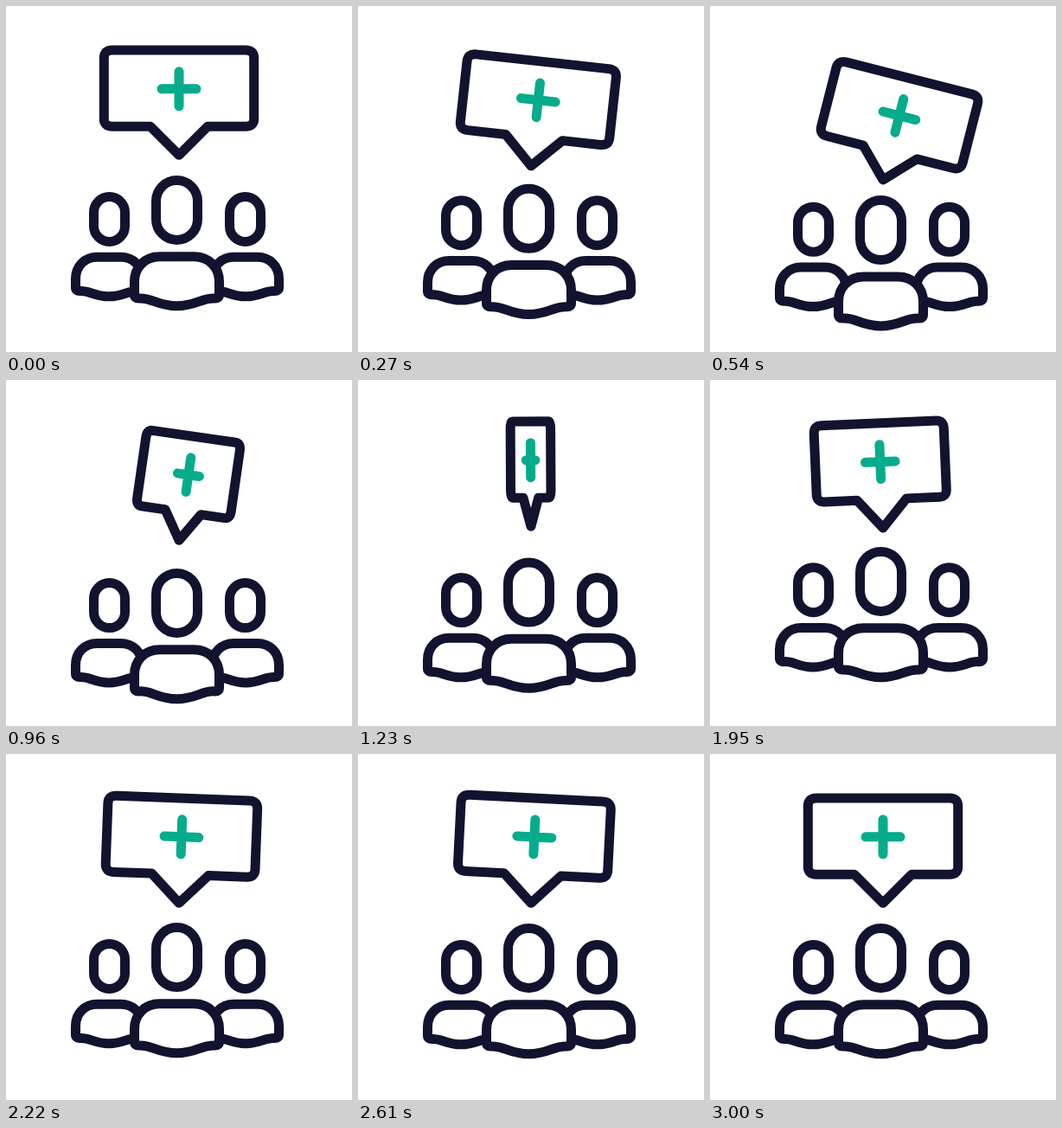
An HTML page with a canvas that plays this animation: 400x400 px, repeating every 3.09 s.

```html
<!DOCTYPE html>
<html lang="en">
<head>
<meta charset="utf-8">
<title>Team and speech bubble</title>
<style>
html, body { margin: 0; width: 100%; height: 100%; overflow: hidden; background: #fff; }
canvas { display: block; width: 400px; height: 400px; }
</style>
</head>
<body>
<canvas id="stage" width="400" height="400"></canvas>
<script>
const ctx = document.getElementById('stage').getContext('2d');
const NAVY = '#11132f', GREEN = '#04ac8c';
const STEP = 30, END = 3000, LOOP = 3090;
const TIP = { x: 200, y: 172.3 };

// Eased progress from 0 to 1 between two times.
function ease(t, from, to) {
  const u = Math.min(1, Math.max(0, (t - from) / (to - from)));
  return u * u * (3 - 2 * u);
}

// Each motion dips, swings back a little too far, then settles.
const leaderY = t => 24.2 * ease(t, 0, 620) - 28 * ease(t, 820, 1615) + 3.8 * ease(t, 1750, 2450);
const sideY = t => 15 * ease(t, 0, 770) - 19.2 * ease(t, 830, 1810) + 4.2 * ease(t, 1850, 2400);
const bubbleY = t => 29.5 * ease(t, 0, 600) - 35 * ease(t, 600, 1350) + 5.5 * ease(t, 1500, 2150);
const tilt = t => 14.7 * ease(t, 0, 600) - 21 * ease(t, 600, 1573) +
  10.1 * ease(t, 1600, 2430) - 3.8 * ease(t, 2430, 3000);
// The card makes half a turn in two overlapping quarters.
const turn = t => Math.PI / 2 * (ease(t, 200, 1600) + ease(t, 1300, 2360));

function pill(x, y, w, h) {
  const p = new Path2D(), r = w / 2;
  p.arc(x + r, y + r, r, Math.PI, 0);
  p.arc(x + r, y + h - r, r, 0, Math.PI);
  p.closePath();
  return p;
}

// Shoulders with a wavy hem, centred on x.
function torso(x, top, half, shoulder, foot, hem) {
  const p = new Path2D(), l = x - half, r = x + half;
  p.moveTo(l, foot - 4);
  p.lineTo(l, top + shoulder);
  p.bezierCurveTo(l, top + shoulder * 0.42, l + shoulder * 0.42, top, l + shoulder, top);
  p.lineTo(r - shoulder, top);
  p.bezierCurveTo(r - shoulder * 0.42, top, r, top + shoulder * 0.42, r, top + shoulder);
  p.lineTo(r, foot - 4);
  p.quadraticCurveTo(r, foot, r - 5, foot);
  p.bezierCurveTo(x + half * 0.58, foot - 1, x + half * 0.46, hem, x, hem);
  p.bezierCurveTo(x - half * 0.46, hem, x - half * 0.58, foot - 1, l + 5, foot);
  p.quadraticCurveTo(l, foot, l, foot - 4);
  p.closePath();
  return p;
}

const leaderHead = pill(173.5, 201.5, 48, 69);
const leaderBody = torso(197.5, 289.8, 49, 29, 338, 346.8);
const sideHead = pill(101.5, 220.5, 36, 52);
const sideBody = torso(119, 290.3, 38.5, 25, 329.5, 335.8);

// Bubble and plus are relative to the bubble's tip.
const bubble = new Path2D('M0 0L-33 -33H-77Q-86.7 -33 -86.7 -42V-112Q-86.7 -121.3 -77 -121.3' +
  'H77Q86.7 -121.3 86.7 -112V-42Q86.7 -33 77 -33H33Z');
const plus = new Path2D('M-20 -76.5H20M0 -96.5V-56.5');

function outline(path, color = NAVY) {
  ctx.strokeStyle = color;
  ctx.stroke(path);
}

function drawSide(dy, mirrored) {
  ctx.save();
  ctx.translate(mirrored ? 396 : 0, dy);
  if (mirrored) ctx.scale(-1, 1);
  outline(sideHead);
  outline(sideBody);
  ctx.restore();
}

function drawLeader(dy) {
  ctx.save();
  ctx.translate(0, dy);
  outline(leaderHead);
  ctx.fillStyle = '#fff';
  ctx.fill(leaderBody);
  outline(leaderBody);
  ctx.restore();
}

function drawBubble(t) {
  const place = new DOMMatrix()
    .translate(TIP.x, TIP.y + bubbleY(t))
    .rotate(tilt(t))
    .scale(Math.abs(Math.cos(turn(t))), 1);
  // Transform the path only, so the line keeps its weight.
  for (const [shape, color] of [[bubble, NAVY], [plus, GREEN]]) {
    const p = new Path2D();
    p.addPath(shape, place);
    outline(p, color);
  }
}

function draw(t) {
  ctx.fillStyle = '#fff';
  ctx.fillRect(0, 0, 400, 400);
  ctx.lineWidth = 11;
  ctx.lineCap = ctx.lineJoin = 'round';
  drawSide(sideY(t), false);
  drawSide(sideY(t), true);
  drawLeader(leaderY(t));
  drawBubble(t);
}

let start;
function tick(now) {
  if (start === undefined) start = now;
  const t = (now - start) % LOOP;
  draw(Math.min(END, Math.floor(t / STEP) * STEP));
  requestAnimationFrame(tick);
}
draw(0);
requestAnimationFrame(tick);
</script>
</body>
</html>
```
